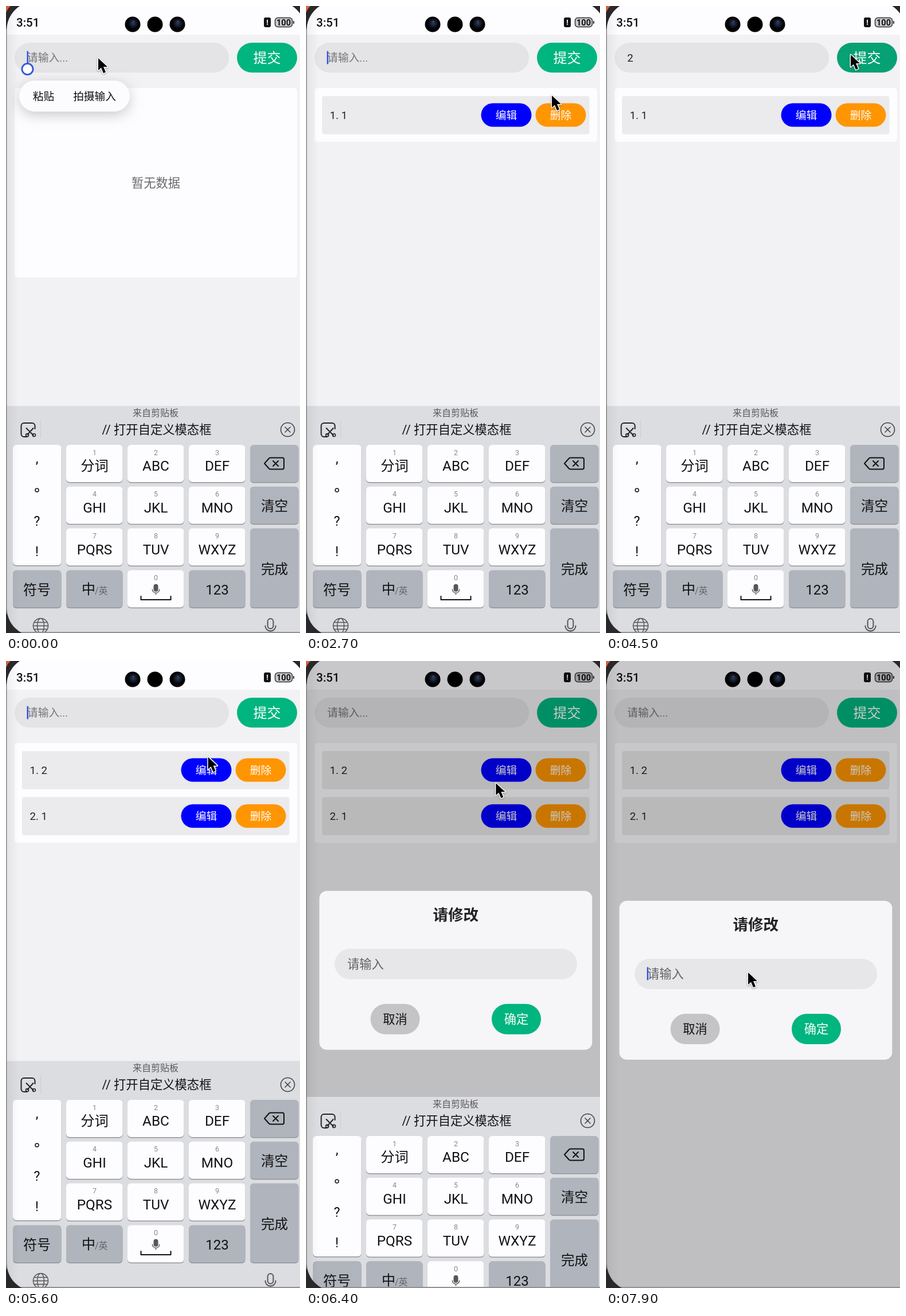
Write an HTML page with a canvas that moves like this. It is 513 by 1093 pixels and loops after 8000 ms.

```html
<!DOCTYPE html>
<html lang="zh">
<head>
<meta charset="utf-8">
<style>
  html, body { margin: 0; width: 100%; height: 100%; overflow: hidden; }
  canvas { display: block; }
</style>
</head>
<body>
<canvas id="stage" width="513" height="1093"></canvas>
<script>
const c = document.getElementById('stage').getContext('2d');
const FONT = 'Roboto, "Noto Sans CJK SC", "Noto Sans CJK", sans-serif';
const GREEN = '#00b57f', BLUE = '#3355dc';
const LOOP = 8000;

// Moments of the interaction, in ms
const TYPE_1 = 1300, SUBMIT_1 = 2300, TYPE_2 = 3900, SUBMIT_2 = 4600;
const OPEN = 6200, HIDE_KEYS = 6300, FOCUS = 7500;

// Pointer path: time, x, y
const POINTER = [
  [0, 160, 89], [1300, 160, 89], [1700, 250, 61], [2100, 430, 84], [2300, 430, 84],
  [2700, 428, 154], [3500, 428, 154], [4100, 426, 83], [4800, 426, 83], [5800, 333, 186],
  [6300, 333, 186], [6600, 325, 261], [7300, 247, 541], [8000, 247, 541]
];

const clamp = v => Math.max(0, Math.min(1, v));
const smooth = v => v * v * (3 - 2 * v);
const blink = age => age % 1000 < 500;

function box(x, y, w, h, r, fill) {
  c.beginPath();
  c.roundRect(x, y, w, h, r);
  c.fillStyle = fill;
  c.fill();
}

// y is the vertical middle of the glyphs
function text(str, x, y, size, fill, align = 'center', weight = 400) {
  c.font = `${weight} ${size}px ${FONT}`;
  c.textAlign = align;
  c.fillStyle = fill;
  c.fillText(str, x, y + size * 0.37);
}

function line(path, width, color = '#222', x = 0, y = 0) {
  c.save();
  c.translate(x, y);
  c.lineWidth = width;
  c.strokeStyle = color;
  c.lineCap = c.lineJoin = 'round';
  c.stroke(new Path2D(path));
  c.restore();
}

function disc(x, y, r, fill) {
  box(x - r, y - r, 2 * r, 2 * r, r, fill);
}

function pill(label, x, y, w, h, fill, size, color = '#fff', weight = 400) {
  box(x, y, w, h, h / 2, fill);
  text(label, x + w / 2, y + h / 2, size, color, 'center', weight);
}

const caret = (x, y) => box(x, y - 11.5, 2.5, 23, 1, BLUE);

function statusBar() {
  box(0, 0, 513, 50, 0, '#fdfcff');
  text('3:51', 18, 28, 20.5, '#111', 'left', 500);
  box(450, 20, 12, 17, 3, '#111');
  text('!', 456, 28.5, 13, '#fff', 'center', 700);
  box(469.5, 20.5, 30, 16, 5, '#c9c8cb');
  c.lineWidth = 1.5;
  c.strokeStyle = '#333';
  c.stroke();
  box(501, 26, 2, 5, 1, '#333');
  text('100', 484.5, 28.5, 14.5, '#111', 'center', 700);
}

function cameras() {
  for (const x of [221, 260, 299]) {
    disc(x, 32, 13.5, '#000');
    if (x === 260) continue;
    const lens = c.createRadialGradient(x + 1, 30, 1, x + 1, 30, 10);
    lens.addColorStop(0, '#2b3550');
    lens.addColorStop(0.5, '#121a2d');
    lens.addColorStop(1, '#000');
    disc(x, 32, 12, lens);
    disc(x + 1, 27, 1.2, '#4a5878');
  }
}

function inputRow(t) {
  box(15, 64, 374, 52, 26, '#e4e3e6');
  const value = t >= TYPE_1 && t < SUBMIT_1 ? '1' : t >= TYPE_2 && t < SUBMIT_2 ? '2' : '';
  text(value || '请输入...', 37, 90, 18.8, value ? '#222' : '#757477', 'left');
  const since = [SUBMIT_2, TYPE_2, SUBMIT_1, TYPE_1, 0].find(m => t >= m);
  if (t < OPEN && (since === 0 || blink(t - since))) caret(value ? 45.5 : 36.5, 90);
  const pressed = [SUBMIT_1, SUBMIT_2].some(m => t >= m - 100 && t < m);
  pill('提交', 403, 64, 105, 52, pressed ? '#06a174' : GREEN, 24);
}

function list(items) {
  const count = items.length;
  box(15, 143, 493, count ? 13.5 + 80.2 * count : 330, 5, '#fdfcff');
  if (!count) text('暂无数据', 261.5, 308, 21.2, '#69686b');
  items.forEach((item, i) => {
    const y = 157 + 80.2 * i;
    box(28, y, 466.5, 66.5, 4, '#ebeaec');
    text(`${i + 1}. ${item}`, 41.5, y + 33, 18.7, '#222', 'left');
    pill('编辑', 305.5, y + 12.5, 88, 41, '#0000ff', 18.7);
    pill('删除', 400.5, y + 12.5, 88, 41, '#ff9500', 18.7);
  });
}

function pasteMenu() {
  disc(37.5, 110, 11, BLUE);
  disc(37.5, 110, 8.2, '#fff');
  c.save();
  c.shadowColor = 'rgba(0,0,0,.2)';
  c.shadowBlur = 22;
  c.shadowOffsetY = 6;
  box(23, 130, 193, 54, 27, '#fcfbfe');
  c.restore();
  text('粘贴', 65.5, 157, 18.7, '#111', 'center', 500);
  text('拍摄输入', 154.5, 157, 18.7, '#111', 'center', 500);
}

function key(x, y, w, h, gray) {
  box(x, y + 1.5, w, h, 6, '#92959b');
  box(x, y, w, h, 6, gray ? '#b0b4bd' : '#fdfcff');
}

function mic(x, y, s, filled) {
  c.save();
  c.translate(x, y);
  c.scale(s, s);
  if (filled) box(-3.5, -9, 7, 12, 3.5, '#555');
  line('M-3.5 -5.5a3.5 3.5 0 0 1 7 0V0a3.5 3.5 0 0 1-7 0ZM-6.5 0a6.5 6.5 0 0 0 13 0M0 6.5V9.5', 1.4, '#555');
  c.restore();
}

function keyboard(offset) {
  c.save();
  c.translate(0, offset);
  box(0, 697, 513, 396, 0, '#dbdde0');
  box(0, 697, 513, 1, 0, '#e3e4e7');
  text('来自剪贴板', 261, 709, 16, '#59595c');
  text('// 打开自定义模态框', 263, 738.5, 21.3, '#111');
  line('M-2 12H-7a5 5 0 0 1-5-5V-7a5 5 0 0 1 5-5H7a5 5 0 0 1 5 5V-2M-3 -3L9 9M9 -3L-1 8', 2, '#222', 38.5, 739);
  line('M1 9a2.5 2.5 0 1 1-5 0a2.5 2.5 0 1 1 5 0M13 9a2.5 2.5 0 1 1-5 0a2.5 2.5 0 1 1 5 0', 1.7, '#222', 38.5, 739);
  box(60, 722, 1, 32, 0, '#cbcdd1');
  line('M12 0A12 12 0 1 1-12 0A12 12 0 1 1 12 0M-4.5 -4.5L4.5 4.5M4.5 -4.5L-4.5 4.5', 1.6, '#444', 491.5, 738.5);

  key(12, 765, 84.5, 210);
  text(',', 54, 788, 24, '#111');
  line('M3 0A3 3 0 1 1-3 0A3 3 0 1 1 3 0', 1.5, '#111', 54, 844);
  text('?', 54, 897.5, 23, '#111');
  text('!', 54, 950.5, 23, '#111');

  ['分词', 'ABC', 'DEF', 'GHI', 'JKL', 'MNO', 'PQRS', 'TUV', 'WXYZ'].forEach((label, i) => {
    const x = 105 + 107 * (i % 3), y = 765 + 72.8 * Math.floor(i / 3);
    key(x, y, 98.5, 65);
    text(i + 1, x + 49.5, y + 13, 12.5, '#88878a');
    text(label, x + 49.5, y + 36.5, 24.3, '#111');
  });

  key(426, 765, 84.5, 65, true);
  line('M-17 0L-9 -9Q-8 -10-6 -10H14Q17 -10 17 -7V7Q17 10 14 10H-6Q-8 10-9 9ZM-2 -4.5L7 4.5M7 -4.5L-2 4.5', 2, '#111', 468, 797.5);
  key(426, 837.8, 84.5, 65, true);
  text('清空', 468.5, 871.5, 23.6, '#111');
  key(426, 910.6, 84.5, 138, true);
  text('完成', 468.5, 981, 23.6, '#111');

  const y = 983.4;
  key(12, y, 84.5, 65, true);
  text('符号', 54, 1017, 24, '#111');
  key(105, y, 98.5, 65, true);
  text('中', 144, 1016, 24, '#111');
  text('/英', 155, 1019, 16, '#66686d', 'left');
  key(212, y, 98.5, 65);
  text('0', 261.5, 996.5, 12.5, '#88878a');
  mic(261.5, 1017, 0.95, true);
  line('M235.5 1029V1035H287.5V1029', 2, '#111');
  key(319, y, 98.5, 65, true);
  text('123', 368.5, 1017.5, 24, '#111');

  line('M13 0A13 13 0 1 1-13 0A13 13 0 1 1 13 0M6 0A6 13 0 1 1-6 0A6 13 0 1 1 6 0M-13 0H13M-11 -6H11M-11 6H11', 1.5, '#555', 60.5, 1080.5);
  mic(461.5, 1080.5, 1.4);
  c.restore();
}

function dialog(shown, centerY, focused) {
  const scale = 0.908 + 0.092 * shown;
  c.save();
  c.globalAlpha = shown;
  c.translate(261.3, centerY);
  c.scale(scale, scale);
  c.translate(-261.3, -138.5);
  box(23.3, 0, 476, 277, 13, '#f6f5f8');
  text('请修改', 261.3, 41.5, 26.5, '#222', 'center', 700);
  box(50, 101, 423, 53, 26.5, '#e7e6e9');
  text('请输入', 72, 127, 21.2, '#606063', 'left');
  if (focused) caret(71.5, 127);
  pill('取消', 112.5, 197, 86, 53, '#c4c3c6', 21.2, '#111', 500);
  pill('确定', 324, 197, 86, 53, GREEN, 21.2, '#fff', 500);
  c.restore();
}

function pointer(t) {
  const i = POINTER.findIndex(p => p[0] > t);
  const [t0, x0, y0] = POINTER[i - 1], [t1, x1, y1] = POINTER[i];
  const k = (t - t0) / (t1 - t0);
  c.save();
  c.translate(x0 + (x1 - x0) * k, y0 + (y1 - y0) * k);
  const arrow = 'M1 2V23L6 18.5L10 28L14 26.2L10 17H17Z';
  c.shadowColor = 'rgba(0,0,0,.35)';
  c.shadowBlur = 3;
  c.shadowOffsetY = 1;
  line(arrow, 3, '#fff');
  c.shadowColor = 'transparent';
  c.fillStyle = '#000';
  c.fill(new Path2D(arrow));
  c.restore();
}

function deviceEdge() {
  const shade = c.createLinearGradient(0, 0, 22, 0);
  shade.addColorStop(0, 'rgba(0,0,0,.06)');
  shade.addColorStop(1, 'rgba(0,0,0,0)');
  box(0, 0, 22, 1093, 0, shade);
  box(0, 1091, 513, 2, 0, '#929295');
  c.beginPath();
  c.rect(0, 0, 513, 1093);
  c.roundRect(1.2, -8, 521, 1107, [50, 50, 0, 50]);
  c.fillStyle = '#29282b';
  c.fill('evenodd');
  box(0, 40, 1.2, 1020, 0, '#8d8c8f');
  c.fillStyle = '#d9623f';
  c.fill(new Path2D('M0 0H8Q3 4 0 12Z'));
}

function draw(t) {
  const shown = clamp((t - OPEN) / 200);
  const hidden = smooth(clamp((t - HIDE_KEYS) / 400));
  box(0, 0, 513, 1093, 0, '#f2f1f3');
  statusBar();
  inputRow(t);
  list(t < SUBMIT_1 ? [] : t < SUBMIT_2 ? [1] : [2, 1]);
  if (t < TYPE_1) pasteMenu();
  if (shown) {
    box(0, 0, 513, 1093, 0, `rgba(0,0,0,${0.21 * shown})`);
    dialog(shown, 536 + 20.5 * hidden, t >= FOCUS && blink(t - FOCUS));
  }
  keyboard(403 * hidden);
  cameras();
  deviceEdge();
  pointer(t);
}

function tick() {
  draw(Math.floor(performance.now() % LOOP / 100) * 100);
  requestAnimationFrame(tick);
}
tick();
</script>
</body>
</html>
```
